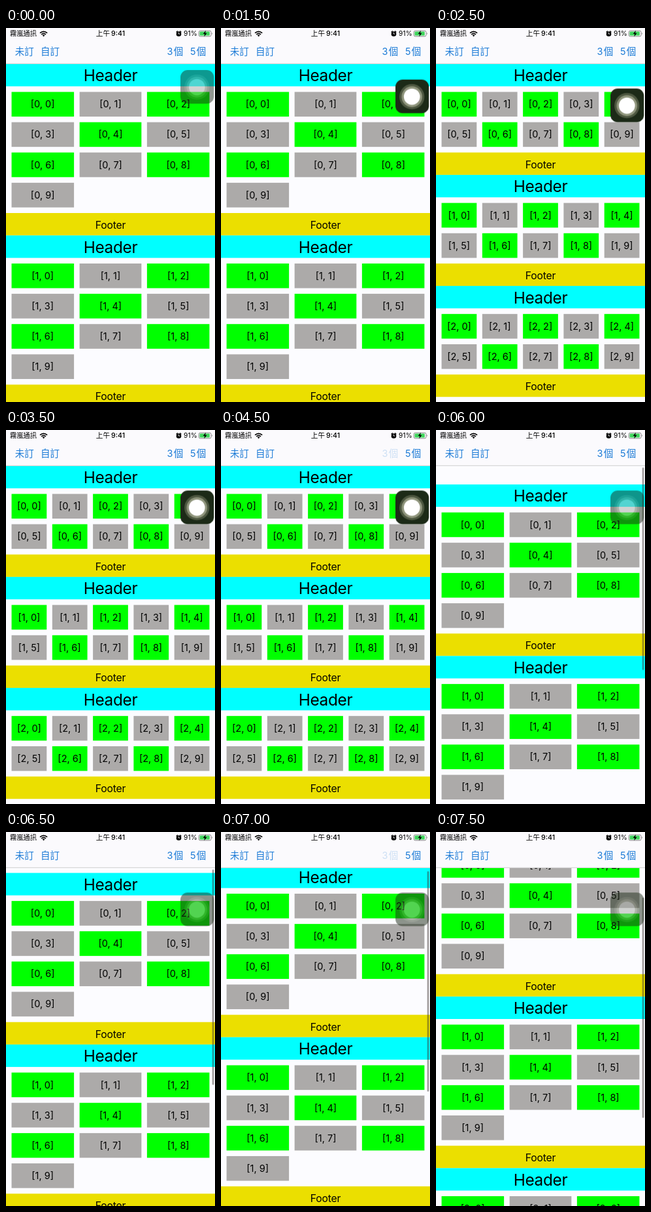
Recreate the animation shown at these times as an HTML page. Size 320 by 570 pixels, loop 8000 ms.

```html
<!DOCTYPE html>
<html lang="zh-Hant">
<head>
<meta charset="utf-8">
<title>Grid layout demo</title>
<style>
html, body { margin: 0; width: 100%; height: 100%; overflow: hidden; background: #fcfcff; }

/* Laid out as a 375 x 667pt screen, scaled to the 320 x 570px stage. */
#phone {
  position: absolute; left: 0; top: 0; width: 375px; height: 667px; overflow: hidden;
  transform: scale(calc(320 / 375), calc(570 / 667)); transform-origin: 0 0;
  background: #fcfcff; color: #000; font: 17px Inter, sans-serif;
}
#phone * { box-sizing: border-box; }

#list, .cells, #bar, #touch, #touch i, .tap3, .tap5 { animation: 8s step-end infinite; }

#list { position: absolute; left: 0; top: 64px; width: 375px; animation-name: scroll; }
.head, .foot { height: 40px; text-align: center; }
.head { background: #0ff; font-size: 28.6px; letter-spacing: -.4px; line-height: 41px; }
.foot { background: #ebdf00; font-size: 18.4px; letter-spacing: -.2px; line-height: 42px; }
.cells {
  display: grid; gap: 10px; padding: 10px; grid-auto-rows: 44px;
  grid-template-columns: repeat(3, 1fr); animation-name: columns;
}
.cells div { background: #acaaa9; line-height: 45px; text-align: center; white-space: nowrap; min-width: 0; }
.cells div:nth-child(odd) { background: #0f0; }

#bar {
  position: absolute; left: 369.5px; top: 67px; width: 3px; height: 393px;
  border-radius: 2px; background: rgba(60, 50, 50, .5); opacity: 0; animation-name: bar;
}

#nav {
  position: absolute; left: 0; top: 0; width: 375px; height: 64px;
  background: #fbfafd; border-bottom: 1px solid #c9c9c9;
}
#nav span { position: absolute; white-space: nowrap; font-family: Inter, "Noto Sans CJK TC", "Noto Sans CJK", sans-serif; }
#nav .status { top: 1px; font-size: 12px; line-height: 18px; }
#nav .time { left: 0; width: 375px; text-align: center; font-weight: 500; font-size: 12.5px; word-spacing: -1px; }
#nav .item { top: 30px; line-height: 24px; font-size: 17px; color: #1a7ad6; }
#nav b { font-weight: 400; margin-right: 1.5px; }
#nav svg { position: absolute; left: 0; top: 0; }
.tap3 { animation-name: tap3; }
.tap5 { animation-name: tap5; }

#touch {
  position: absolute; left: 312.5px; top: 75px; width: 60px; height: 60px;
  border-radius: 13px; background: #1c2a17; opacity: .48; animation-name: touch;
}
#touch i {
  position: absolute; left: 50%; top: 50%; width: 29px; height: 29px; margin: -14.5px;
  border-radius: 50%; background: #fff; opacity: .6; animation-name: dot;
  box-shadow: 0 0 0 4px #8f957c, 0 0 0 8px #4d5740;
}

@keyframes columns {
  0% { grid-template-columns: repeat(3, 1fr); }
  31.25% { grid-template-columns: repeat(5, 1fr); }
  62.5%, 100% { grid-template-columns: repeat(3, 1fr); }
}
@keyframes scroll {
  0% { transform: translateY(0); }
  62.5% { transform: translateY(-184.5px); }
  68.75% { transform: translateY(-82px); }
  75% { transform: translateY(33px); }
  81.25% { transform: translateY(9px); }
  87.5% { transform: translateY(-4px); }
  93.75%, 100% { transform: translateY(-76.5px); }
}
@keyframes bar {
  0% { opacity: 0; }
  68.75% { opacity: 1; top: 121px; height: 393px; }
  75% { opacity: 1; top: 67px; height: 361px; }
  81.25% { opacity: 1; top: 67px; height: 384px; }
  87.5% { opacity: 1; top: 70px; height: 393px; }
  93.75%, 100% { opacity: 1; top: 117px; height: 393px; }
}
@keyframes touch {
  0% { top: 75px; opacity: .48; }
  18.75% { top: 92px; opacity: 1; }
  25% { top: 108px; opacity: 1; }
  68.75% { top: 108px; opacity: .75; }
  75%, 100% { top: 108px; opacity: .5; }
}
@keyframes dot {
  0% { opacity: .6; }
  18.75% { opacity: 1; }
  75%, 100% { opacity: .6; }
}
@keyframes tap3 {
  0% { opacity: 1; }
  56.25% { opacity: .2; }
  62.5% { opacity: 1; }
  87.5% { opacity: .2; }
  93.75%, 100% { opacity: 1; }
}
@keyframes tap5 {
  0% { opacity: 1; }
  25% { opacity: .2; }
  31.25%, 100% { opacity: 1; }
}
</style>
</head>
<body>
<div id="phone">
  <div id="list"></div>
  <div id="bar"></div>
  <div id="nav">
    <span class="status" style="left:7px">霧嵐通訊</span>
    <span class="status time">上午 9:41</span>
    <span class="status" style="right:32px">91%</span>
    <svg width="375" height="20">
      <g fill="none" stroke="#000" stroke-width="2">
        <path d="M61 9Q67.500 3.500 74 9M63.500 11.500Q67.500 8 71.500 11.500"/>
        <path d="M305.500 7.500l2.500-2.300M314.500 7.500l-2.500-2.300" stroke-width="1.500"/>
      </g>
      <path d="M65.200 13Q67.500 11 69.800 13L67.500 15.500z"/>
      <circle cx="310" cy="10.500" r="4.500"/>
      <path d="M310 8v2.700h2" fill="none" stroke="#fff"/>
      <rect x="346" y="5" width="22" height="10" rx="2.500" fill="none" stroke="#777"/>
      <rect x="347.500" y="6.500" width="18" height="7" rx="1" fill="#3fd45c"/>
      <path d="M369.500 8q2 2 0 4z" fill="#777"/>
      <path d="M358.500 4.500l-5 6h3l-1 5 5-6.500h-3z"/>
    </svg>
    <span class="item" style="left:16px">未訂</span>
    <span class="item" style="left:62px">自訂</span>
    <span class="item tap3" style="right:57px"><b>3</b>個</span>
    <span class="item tap5" style="right:16px"><b>5</b>個</span>
  </div>
  <div id="touch"><i></i></div>
</div>
<script>
const list = document.getElementById('list');
for (let s = 0; s < 3; s++) {
  const cells = Array.from({ length: 10 }, (_, i) => `<div>[${s}, ${i}]</div>`).join('');
  list.insertAdjacentHTML('beforeend',
    `<div class="head">Header</div><div class="cells">${cells}</div><div class="foot">Footer</div>`);
}
</script>
</body>
</html>
```
